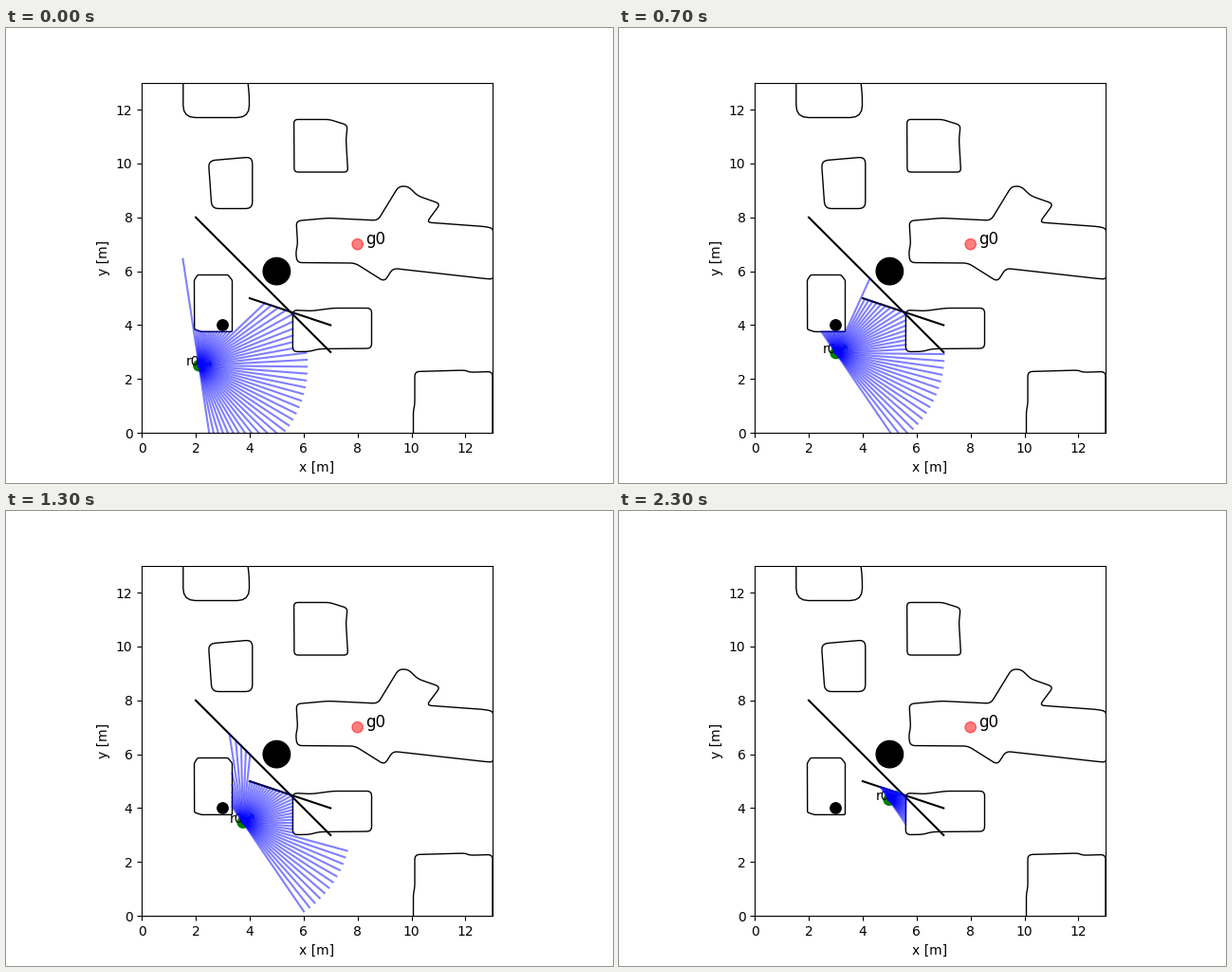
A matplotlib script that plays this animation: 640 by 480 pixels, repeating every 5.4 s.

```python
import numpy as np
import matplotlib.pyplot as plt
from matplotlib.animation import FuncAnimation
from matplotlib.collections import LineCollection
from matplotlib.patches import Circle, Polygon

SIZE = 13.0            # world is SIZE x SIZE metres
STEP = 0.1             # seconds per step
MOVES, FRAMES = 24, 54
V_MAX = W_MAX = 1.5
RANGE, BEAMS = 4.0, 50
GOAL = np.array([8.0, 7.0])

SCALE = 369.6 / SIZE   # stage pixels per metre
LEFT, BOTTOM = 143.2, 427.2

BARS = [[(2, 8), (7, 3)], [(4, 5), (7, 4)]]
DISKS = [((5, 6), 0.5), ((3, 4), 0.2)]


def rounded(radius, *corners):
    """Polygon in metres from corners in stage pixels, each corner rounded."""
    p = np.array(corners, float)
    out = []
    for a, b, c in zip(np.roll(p, 1, axis=0), p, np.roll(p, -1, axis=0)):
        u, v = a - b, c - b
        lu, lv = np.hypot(*u), np.hypot(*v)
        u *= min(radius / lu, 0.45)
        v *= min(radius / lv, 0.45)
        for t in np.linspace(0, 1, 5):
            out.append(b + u * (1 - t) ** 2 + v * t ** 2)
    x, y = np.array(out).T
    return np.column_stack([(x - LEFT) / SCALE, (BOTTOM - y) / SCALE])


walls = [
    rounded(13, (186.8, 40), (252, 40), (256.5, 66), (256.5, 94.5),
            (186.8, 94.5)),
    rounded(7, (213.4, 140), (259.8, 136), (259.8, 190.5), (217, 190.5)),
    rounded(4, (303.6, 96.5), (341, 96.5), (360, 102.5), (358.5, 118),
            (360.5, 152), (303.9, 152)),
    rounded(5, (306, 203.5), (340, 200.5), (392, 203), (414, 167),
            (424, 167), (434, 177), (458, 185.5), (443.5, 205), (505, 209.5),
            (514, 211.5), (514, 265), (506, 264.5), (408, 253.5),
            (399, 267.5), (368, 248), (307, 247.5), (305.5, 237),
            (307.5, 228)),
    rounded(1.5, (198.5, 266), (202, 260.5), (234, 260.5), (238.5, 266),
            (238.5, 320.4), (206, 320.4), (198.7, 318)),
    rounded(5, (302.4, 297.5), (322, 298.5), (345, 295.5), (385.5, 295.5),
            (385.5, 338), (330, 338.5), (320, 341.3), (302.3, 341.5)),
    rounded(5, (429.5, 440), (429.5, 404), (431, 397), (431, 362.5),
            (484, 361), (489, 363.2), (513, 362.5), (513, 440)),
]


def ring(centre, radius, n=72):
    a = np.arange(n) * 2 * np.pi / n
    return np.array(centre) + radius * np.column_stack([np.cos(a), np.sin(a)])


def cross(a, b):
    return a[..., 0] * b[..., 1] - a[..., 1] * b[..., 0]


def drive():
    """Head for the goal, turning at full rate until roughly aligned."""
    x, y, th = 2.0, 2.5, 0.0
    poses = []
    for _ in range(MOVES):
        off = np.arctan2(GOAL[1] - y, GOAL[0] - x) - th
        v = V_MAX * np.cos(off)
        w = W_MAX * np.sign(off) if abs(off) > 0.2 else 0.0
        x += v * np.cos(th) * STEP
        y += v * np.sin(th) * STEP
        th += w * STEP
        poses.append((x, y, th))
    return poses


closed = walls + [ring(c, r) for c, r in DISKS]
starts = np.vstack(closed + [[b[0]] for b in BARS])
ends = np.vstack([np.roll(c, -1, axis=0) for c in closed]
                 + [[b[1]] for b in BARS])
edges = ends - starts


def scan(pos, heading):
    """Beam segments from pos, each cut at the first obstacle edge."""
    a = heading + np.linspace(-np.pi / 2, np.pi / 2, BEAMS)
    rays = np.column_stack([np.cos(a), np.sin(a)])
    gap = starts - pos
    with np.errstate(divide="ignore", invalid="ignore"):
        det = cross(rays[:, None], edges[None])
        dist = cross(gap, edges)[None] / det
        along = cross(gap[None], rays[:, None]) / det
    hit = (dist > 0) & (along >= 0) & (along <= 1)
    reach = np.where(hit, dist, RANGE).min(axis=1).clip(max=RANGE)
    tips = pos + rays * reach[:, None]
    return np.stack([np.broadcast_to(pos, tips.shape), tips], axis=1)


poses = drive()

fig, ax = plt.subplots(figsize=(6.4, 4.8), dpi=100)
ax.set_aspect("equal")
ax.set_xlim(0, SIZE)
ax.set_ylim(0, SIZE)
ax.set_xlabel("x [m]")
ax.set_ylabel("y [m]")

for w in walls:
    ax.add_patch(Polygon(w, fill=False, edgecolor="k", lw=1))
for c, r in DISKS:
    ax.add_patch(Circle(c, r, color="k"))
for b in BARS:
    ax.plot(*zip(*b), "k-")

ax.add_patch(Circle(GOAL, 0.2, color="r", alpha=0.5))
ax.text(GOAL[0] + 0.3, GOAL[1], "g0", fontsize=12, color="k")

half = np.array([(0, 0.06), (0.4, 0.06), (0.4, 0.18), (0.5, 0)])
ARROW = np.vstack([half, half[-2::-1] * (1, -1)])

robot = ax.add_patch(Circle((0, 0), 0.2, color="g", zorder=2))
arrow = ax.add_patch(Polygon(ARROW, facecolor="C0", lw=0, zorder=2.5))
label = ax.text(0, 0, "r0", fontsize=10, color="k", zorder=3)
beams = LineCollection([], colors="b", linewidths=1.5, alpha=0.5,
                       capstyle="projecting", zorder=4)
ax.add_collection(beams, autolim=False)


def draw(i):
    x, y, th = poses[min(i, MOVES - 1)]
    pos = np.array([x, y])
    c, s = np.cos(th), np.sin(th)
    robot.center = (x, y)
    arrow.set_xy(pos + ARROW @ np.array([[c, s], [-s, c]]))
    label.set_position((x - 0.5, y))
    beams.set_segments(scan(pos, th))
    return robot, arrow, label, beams


anim = FuncAnimation(fig, draw, frames=FRAMES, interval=100, repeat=True,
                     init_func=lambda: draw(0))
plt.show()
```
